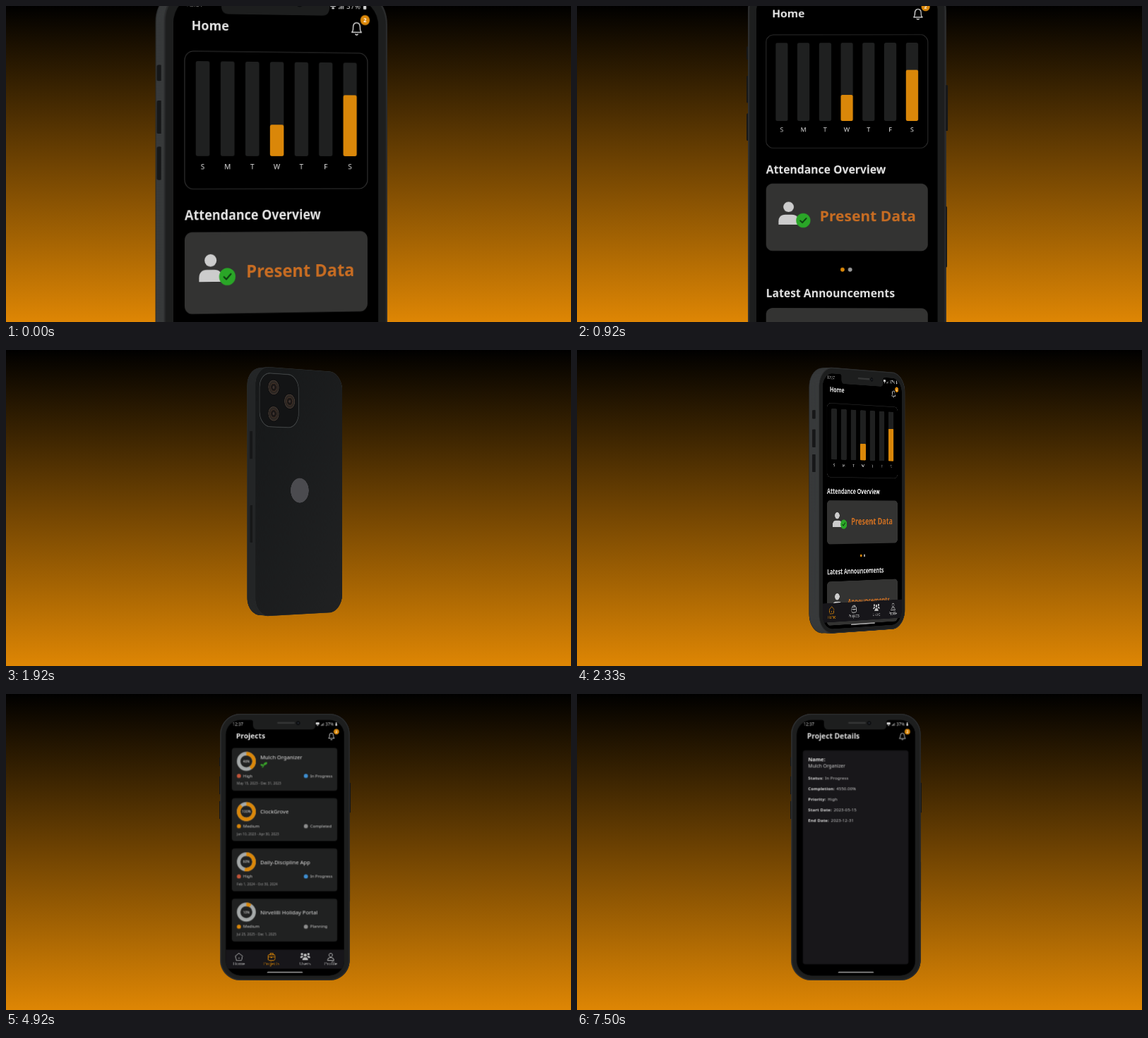
Animation, 800 px wide and 448 px high, one loop 8 s. Source, as an HTML page:

```html
<!DOCTYPE html>
<html lang="en">
<head>
<meta charset="utf-8">
<title>Attendance app showcase</title>
<style>
html, body { margin: 0; width: 100%; height: 100%; overflow: hidden; background: #000; }
#stage {
  position: absolute; left: 0; top: 0; width: 800px; height: 448px; overflow: hidden;
  background: linear-gradient(#000, #de8604);
  perspective: 2700px; perspective-origin: 50% 50%;
}
#phone {
  position: absolute; left: 0; top: 0; width: 364px; height: 752px;
  margin: -376px 0 0 -182px; transform-style: preserve-3d;
  animation: fly 8s infinite;
}
#phone > * { position: absolute; left: 0; top: 0; width: 364px; height: 752px; }
.slice { border-radius: 56px; background: linear-gradient(90deg, #37393a, #232526 40%); }
.slice i { position: absolute; background: #161718; border-radius: 2px; }
#front { transform: translateZ(19px); }
#back { transform: rotateY(180deg) translateZ(19px); }
svg { display: block; overflow: visible; }
text { font-family: "Noto Sans", "Open Sans", sans-serif; white-space: pre; }

/* depth keeps one scale: the camera zooms instead of coming closer */
@keyframes fly {
  0% { transform: translate(377.5px, 320px) scale3d(.924, .924, .5) rotateY(20.6deg); animation-timing-function: cubic-bezier(.3, .3, .6, 1); }
  8.375% { transform: translate(379px, 357px) scale3d(.93, .93, .5) rotateY(24deg); animation-timing-function: cubic-bezier(.5, 0, .3, 1); }
  15.625% { transform: translate(386px, 155px) scale3d(.615, .615, .5) rotateY(-26deg); animation-timing-function: linear; }
  17.5% { transform: translate(386px, 156px) scale3d(.61, .61, .5) rotateY(-30deg); animation-timing-function: cubic-bezier(.4, 0, .7, .6); }
  24% { transform: translate(410px, 201px) scale3d(.46, .46, .5) rotateY(-137deg); animation-timing-function: cubic-bezier(.3, .4, .6, 1); }
  32.75%, 100% { transform: translate(395px, 217px) scale3d(.5, .5, .5) rotateY(-360deg); }
}
#home { animation: home 8s step-end infinite; }
#skeleton { animation: skeleton 8s step-end infinite; }
#list { animation: list 8s step-end infinite; }
#details { animation: details 8s infinite; }
.ring { animation: ring 8s infinite; }
@keyframes home { 0% { opacity: 1; } 36.25%, 100% { opacity: 0; } }
@keyframes skeleton { 0% { opacity: 1; } 53.5%, 100% { opacity: 0; } }
@keyframes list { 0% { opacity: 0; } 53.5%, 100% { opacity: 1; } }
@keyframes details { 0%, 84.4% { opacity: 0; } 86.9%, 100% { opacity: 1; } }
@keyframes ring {
  0%, 54% { stroke-dashoffset: 100; animation-timing-function: cubic-bezier(.25, .5, .5, 1); }
  66%, 100% { stroke-dashoffset: var(--rest); }
}
</style>
</head>
<body>
<div id="stage"><div id="phone"></div></div>
<script>
const ORANGE = '#da8709', LIGHT = '#e4e4e4';

// y is the middle of the capital letters
const text = (x, y, size, str, fill = LIGHT, weight = 400, extra = '') =>
  `<text x="${x}" y="${y + size * .35}" font-size="${size}" font-weight="${weight}" fill="${fill}" ${extra}>${str}</text>`;
const mid = 'text-anchor="middle"';
const rect = (x, y, w, h, r, fill, extra = '') =>
  `<rect x="${x}" y="${y}" width="${w}" height="${h}" rx="${r}" fill="${fill}" ${extra}/>`;
const dot = (x, y, r, fill, extra = '') => `<circle cx="${x}" cy="${y}" r="${r}" fill="${fill}" ${extra}/>`;
const line = (d, color, w = .8) =>
  `<path d="${d}" fill="none" stroke="${color}" stroke-width="${w}" stroke-linejoin="round" stroke-linecap="round"/>`;
const at = (x, y, body, s = 1) => `<g transform="translate(${x} ${y}) scale(${s})">${body}</g>`;

const icons = {
  Home: c => line('M-5-1L0-5L5-1L3.6 5H-3.6Z', c) + dot(0, 2, .7, c),
  Projects: c => rect(-4.8, -3, 9.6, 8, 2, 'none', `stroke="${c}" stroke-width=".9"`) +
    line('M-2-3V-5H2V-3M-4.8 0.6H4.8', c, .9) + rect(-1, -.2, 2, 2, .5, c),
  Users: c => dot(0, -2.4, 2.1, c) + dot(-4.6, -3.6, 1.6, c) + dot(4.6, -3.6, 1.6, c) +
    `<path fill="${c}" d="M-4 5Q-4 .6 0 .6T4 5ZM-7 1.6Q-7-1.4-4.5-1.4Q-2.6-1.4-2.4-.2Q-4 .4-4.4 1.6ZM7 1.6Q7-1.4 4.5-1.4Q2.6-1.4 2.4-.2Q4 .4 4.4 1.6Z"/>`,
  Profile: c => dot(0, -2.4, 2.4, 'none', `stroke="${c}" stroke-width=".9"`) + line('M-4.4 5Q-4.4 1.3 0 1.3T4.4 5Z', c, .9)
};

const nav = active => rect(311, 362, 168, 27, 0, '#17161a') +
  [['Home', 330], ['Projects', 376], ['Users', 423.5], ['Profile', 459.5]].map(([name, x]) => {
    const c = name === active ? ORANGE : '#bcbcbc';
    return at(x, 372, icons[name](c)) + text(x, 382, 6, name, c, 400, mid);
  }).join('');

const header = title => text(326, 60, 10.2, title, LIGHT, 600) +
  at(460.5, 60.5, line('M-4 3Q-2.8 2-2.8-1Q-2.8-4.4 0-4.4T2.8-1Q2.8 2 4 3ZM-1 4.6Q0 5.4 1 4.6', LIGHT)) +
  dot(467.5, 54, 3.9, ORANGE) + text(467.5, 54, 4.6, '2', '#fff', 600, mid);

const status = text(321, 43.3, 5.9, '12:37', '#cfcfcf') +
  rect(438.5, 40.8, 5, 3.2, .8, '#cfcfcf') + rect(440, 44.4, 2, 1.4, .3, '#cfcfcf') +
  [0, 1, 2, 3].map(i => rect(445.4 + i * 1.2, 44.7 - i, .8, 1 + i, 0, '#a8a8a8')).join('') +
  text(452, 43.3, 5.9, '37%', '#cfcfcf') + dot(467.3, 41.9, 1, '#cfcfcf') + rect(466, 43, 2.6, 2.8, .5, '#cfcfcf');

const person = (x, y) => at(x, y, dot(0, -6, 5, '#ccc') +
  '<path fill="#ccc" d="M-9.6 11V8Q-9.6 1.4-3 1.4H3Q9.6 1.4 9.6 8V11Z"/>', .96);

function homeScreen() {
  const bars = [...'SMTWTFS'].map((day, i) => {
    const x = 335 + 20 * i, fill = { 3: 24, 6: 47 }[i] || 0;
    return rect(x - 5.6, 87, 11.2, 72, 1.5, '#1f2020') +
      (fill ? rect(x - 5.6, 159 - fill, 11.2, fill, 1.5, ORANGE) : '') +
      text(x, 167, 5.8, day, LIGHT, 400, mid);
  }).join('');
  return rect(320.5, 79.5, 149, 104.5, 7, 'none', 'stroke="#353535" stroke-width=".6"') + bars +
    header('Home') +
    text(320.5, 203.7, 10.25, 'Attendance Overview', LIGHT, 600) +
    rect(320.5, 216.7, 149, 62, 6, '#333332') + person(341.3, 244) +
    dot(354.8, 250.7, 6.6, '#2aa627') + line('M352.1 250.9L354 252.7L357.7 248.7', '#0c3d10', 1.2) +
    text(370, 246.8, 13.7, 'Present Data', '#c96d22', 700) +
    dot(391, 296, 1.9, ORANGE) + dot(398, 296, 1.9, '#999') +
    text(320.5, 318, 10.25, 'Latest Announcements', LIGHT, 600) +
    rect(320.5, 331.5, 149, 62, 6, '#333332') + person(341.3, 359) +
    text(363, 361.3, 10.9, 'Announcements', '#c96d22', 700) +
    nav('Home');
}

const HIGH = ['High', '#c4553a'], MEDIUM = ['Medium', ORANGE], GOING = ['In Progress', '#3f8fd2'];
const projects = [
  ['Mulch Organizer', 46, HIGH, GOING, 'May 15, 2023 - Dec 31, 2023'],
  ['ClockGrove', 100, MEDIUM, ['Completed', '#8e8e8e'], 'Jan 10, 2023 - Apr 30, 2023'],
  ['Daily-Discipline App', 60, HIGH, GOING, 'Feb 1, 2024 - Oct 30, 2024'],
  ['Nirvelilli Holiday Portal', 10, MEDIUM, ['Planning', '#8e8e8e'], 'Jul 25, 2025 - Dec 1, 2025']
];

const sprout = at(365, 101, '<g fill="#39a22b"><ellipse cx="2.4" cy="-1.8" rx="2.9" ry="1.7" transform="rotate(-30 2.4 -1.8)"/>' +
  '<ellipse cx="-2.3" cy=".2" rx="2.4" ry="1.4" transform="rotate(15 -2.3 .2)"/></g>' + line('M-2.2 3.6Q-.2 3 .3 0', '#39a22b', 1));

function projectCard([name, pct, level, state, dates], i) {
  const y = 77 + 71 * i, titleY = y + (i ? 19.5 : 13.5);
  const ring = (color, extra) => `<circle cx="340.5" cy="${y + 19}" r="10.9" fill="none" stroke="${color}" stroke-width="5" ${extra}/>`;
  const tag = (x, [label, color]) => dot(x, y + 39.5, 2.9, color) + text(x + 6, y + 39.5, 5.9, label, '#d2d2d2');
  return rect(320, y, 149, 60.5, 4, '#202121') + ring('#a6aaaa', '') +
    ring(ORANGE, `class="ring" pathLength="100" stroke-dasharray="100 200" style="--rest:${100 - pct}" transform="rotate(-90 340.5 ${y + 19})"`) +
    text(340.5, y + 19, 4.9, pct + '%', LIGHT, 500, mid) +
    text(360, titleY, 7.6, name, LIGHT, 500) + (i ? '' : sprout) +
    tag(330, level) + tag(424.5, state) + text(327, y + 50.5, 4.8, dates, '#a4a4a4');
}

const skeleton = [0, 1, 2, 3, 4].map(i => rect(316, 79 + 63.1 * i, 158, 56.2, 4, '#696969')).join('') +
  rect(311, 355, 168, 8, 0, '#000');

const rows = [['Status', 'In Progress', 348], ['Completion', '4550.00%', 364], ['Priority', 'High', 352],
  ['Start Date', '2023-05-15', 360.3], ['End Date', '2023-12-31', 356.5]];
const details = rect(311, 49, 168, 341, 0, '#000') + header('Project Details') +
  rect(320, 80.5, 149, 302, 3.5, '#18171a') +
  text(327.5, 93, 7.4, 'Name:', LIGHT, 600) + text(327.5, 102.7, 6.7, projects[0][0], '#d2d2d2') +
  rows.map(([key, value, end], i) => {
    const y = 119.3 + 15.1 * i, gap = 'letter-spacing=".15"';
    return text(327.5, y, 5.9, key + ':', LIGHT, 600, gap) + text(end + 3.2, y, 5.9, value, '#d2d2d2', 400, gap);
  }).join('');

const group = (id, body) => `<g id="${id}">${body}</g>`;
const frame = (id, body) => `<svg id="${id}" viewBox="304 29 182 376" width="364" height="752">${body}</svg>`;

const front = frame('front',
  rect(304, 29, 182, 376, 28, '#2b2c2d') + rect(305.2, 30.2, 179.6, 373.6, 27, '#1d1e1e') +
  '<clipPath id="glass"><rect x="311.5" y="37.5" width="167" height="361" rx="21"/></clipPath><g clip-path="url(#glass)">' +
  rect(311, 37, 168, 362, 0, '#000') +
  header('Projects') + group('skeleton', skeleton) + group('list', projects.map(projectCard).join('')) + nav('Projects') +
  group('home', rect(311, 37, 168, 353, 0, '#000') + homeScreen()) +
  group('details', details) + status +
  rect(370, 393.2, 50, 1.7, .8, '#a9a9a9') + '</g>' +
  '<path fill="#1d1e1e" d="M345 37Q350 37 350 41V45Q350 51 356 51H432Q438 51 438 45V41Q438 37 443 37Z"/>' +
  rect(384, 40.4, 25, 2.4, 1.2, '#363737') + dot(413.5, 41.8, 2.9, '#0c0d0f') + dot(413.5, 41.8, 1.2, '#252a33'));

const lens = (x, y) => dot(x, y, 12.5, '#101011') + dot(x, y, 10.4, '#2c2622', 'stroke="#453a33" stroke-width="1"') +
  dot(x, y, 6, '#1b1716', 'stroke="#4a3427" stroke-width=".8"') + dot(x, y, 2.2, '#3d322e');
const back = frame('back',
  '<linearGradient id="shell" x2="1" y2="1"><stop stop-color="#161819"/><stop offset="1" stop-color="#202122"/></linearGradient>' +
  rect(304, 29, 182, 376, 28, 'url(#shell)', 'stroke="#262829" stroke-width=".8"') +
  rect(312.5, 38, 80, 81, 22, '#131415', 'stroke="#3d4041" stroke-width="1.3"') +
  lens(341, 59) + lens(374, 79) + lens(341, 99) + dot(395, 215, 19, '#4b4b4f'));

// side buttons: left edge, top, height
const keys = [[-4, 122, 24], [-4, 176, 50], [-4, 246, 50], [360, 194, 84], [357.5, 418, 112]]
  .map(([x, y, h]) => `<i style="left:${x}px;top:${y}px;width:8px;height:${h}px"></i>`).join('');
let slices = '';
for (let z = -18; z <= 18; z += 3) {
  slices += `<div class="slice" style="transform:translateZ(${z}px)">${Math.abs(z) < 6 ? keys : ''}</div>`;
}
document.getElementById('phone').innerHTML = back + slices + front;
</script>
</body>
</html>
```
